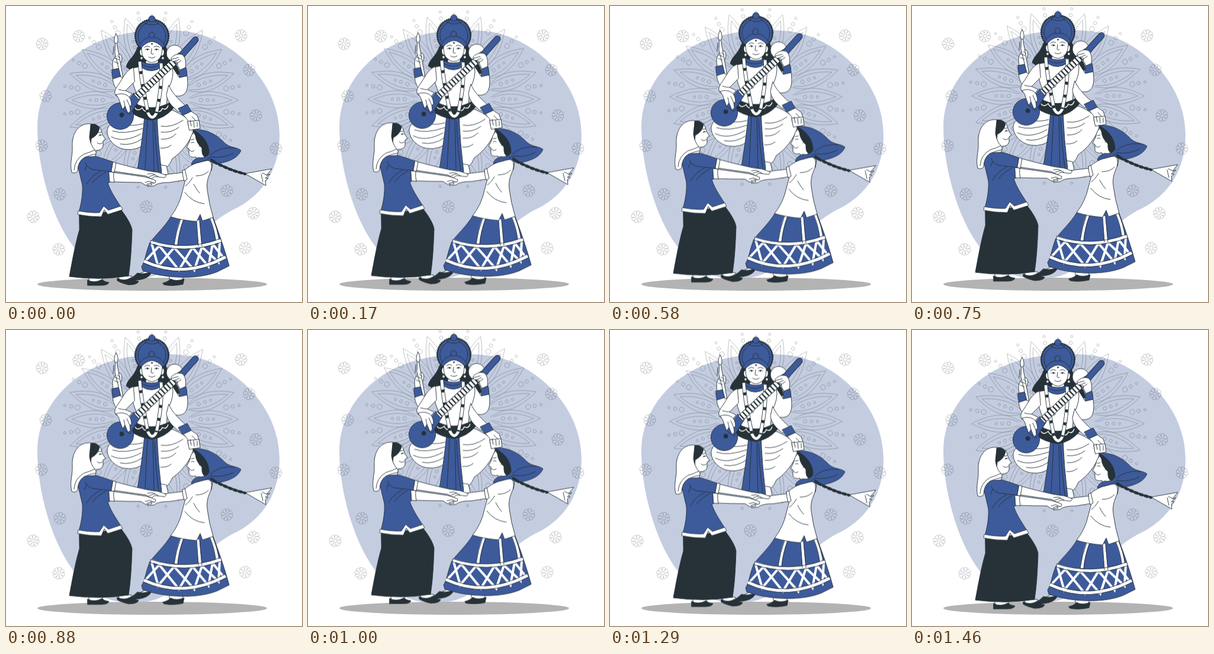
An HTML page for the animation above (1.5 s loop, 500 px wide and 500 px high).

```html
<!DOCTYPE html>
<html lang="en">
<head>
<meta charset="utf-8">
<title>Festival dance</title>
<style>
  html, body { margin: 0; width: 100%; height: 100%; overflow: hidden; background: #fff; }
  svg { display: block; width: 100vw; height: 100vh; }
  .w, .b, .k, .l { stroke: #263238; stroke-width: .9; stroke-linecap: round; stroke-linejoin: round; }
  .w { fill: #fff; }
  .b { fill: #3d5a9b; }
  .k { fill: #263238; }
  .l { fill: none; }
  .band { fill: none; stroke: #fff; stroke-width: 5; }
  .faint { fill: none; stroke: #263238; stroke-width: .8; opacity: .34; }
  #float { animation: float 1.5s linear infinite; }
  @keyframes float {
    0%, 100% { transform: translateY(0); }
    70% { transform: translateY(-10px); }
  }
</style>
</head>
<body>
<svg viewBox="0 0 500 500">
  <defs>
    <g id="petal">
      <path d="M-146 0C-130-8-113-15-93-14.5C-80-13-70-8-62-3M-146 0C-130 8-113 15-93 14.5C-80 13-70 8-62 3"/>
      <path d="M-135 0C-118-7-104-9-90-8.5Q-78-8-66-3M-135 0C-118 7-104 9-90 8.5Q-78 8-66 3"/>
      <circle cx="-83" r="3"/><circle cx="-94" r="2.6"/><circle cx="-104" r="2"/>
      <g transform="rotate(9)">
        <circle cx="-127" r="4.2"/><circle cx="-138" r="2.9"/><circle cx="-149" r="2"/>
      </g>
    </g>
    <path id="leaf" d="M-1.5-4.4C-5-9.8-1.5-10.4 0-9.6C1.5-10.4 5-9.8 1.5-4.4"/>
  </defs>

  <path fill="#c4cce0" d="M53 205C53 150 84 99 140 68C186 43 255 35 312 44C385 58 462 128 462 218C462 276 434 318 390 341C346 361 331 390 303 418C280 445 255 461 215 461C172 461 139 444 115 408C76 357 53 270 53 205Z"/>
  <g id="flowers" class="faint"></g>
  <ellipse cx="247" cy="470" rx="194" ry="11" fill="#b3b3b3"/>

  <g id="float">
    <g id="mandala" class="faint" transform="translate(246.5 159)"></g>

    <g id="musician">
      <path class="k" d="M222 70C216 88 206 90 203 103L226 118L272 112L293 116C293 102 282 95 279 85L268 66Z"/>
      <!-- raised arm with brush -->
      <path class="w" d="M180 121Q181 140 194 145L208 126L193 119Z"/>
      <path class="b" d="M179 108L190 105Q193 112 193 119L181 123Q178 115 179 108Z"/>
      <path class="w" d="M181 107C178 94 182 85 189 82C195 80 197 86 195 93Q193 100 191 105Z"/>
      <path class="w" d="M185 62L187 62L197 117Q198 123 194 120L184 80Z"/>
      <path class="w" d="M186 47Q191 55 188 63L184 63Q181 55 186 47Z"/>
      <path class="l" d="M182 68L181 82M183 88L191 91M183 94L190 97M188 84L193 88"/>
      <!-- raised arm on the neck -->
      <circle class="w" cx="285" cy="80" r="14"/>
      <path class="w" d="M281 103L292 120L306 118C308 132 307 144 301 149C293 155 282 152 274 146L270 118Z"/>
      <path class="b" d="M294 107L304 104Q306 111 306 118L293 121Z"/>

      <!-- legs -->
      <path class="w" d="M219 176C198 188 173 195 171 210C170 224 183 239 200 242Q222 246 240 229L251 190Z"/>
      <path class="w" d="M256 182L281 176C300 184 317 195 316 212C311 229 297 247 281 258Q277 268 272 272L255 270Z"/>
      <path class="w" d="M259 268L271 270L274 284Q269 290 256 287L255 281L262 278Z"/>
      <path class="l" d="M180 211Q199 218 231 207M178 221Q199 232 228 216M193 233Q212 237 231 224M194 199Q214 204 231 199M262 203Q280 206 299 193M262 213Q279 215 292 205M262 225Q278 226 287 216M261 240Q272 241 279 235"/>
      <path class="b" d="M234 187Q230 228 222 277Q229 274 236 279Q243 275 250 281L263 282Q257 234 255 187Z"/>
      <path class="l" d="M239 191L235 276M248 191L250 280M251 196Q252 232 258 280"/>

      <!-- torso -->
      <path class="w" d="M236 93L236 101L213 105Q211 125 219 144L222 171Q247 185 271 171L273 143Q285 120 281 104L257 101L257 91Z"/>
      <path class="k" d="M216 163Q245 181 279 162L284 171Q269 190 246 193Q224 190 208 178Z"/>
      <path fill="none" stroke="#fff" stroke-width="1.4" d="M218 172Q222 179 230 172Q234 181 241 176M254 177Q261 181 264 173Q271 177 274 168"/>
      <path class="b" d="M230 94Q246 102 262 94L264 102Q247 116 229 104Z"/>
      <path class="l" d="M229 99Q246 109 263 97M231 142Q238 147 243 143"/>

      <!-- lower arm -->
      <path class="w" d="M275 134C280 145 288 155 304 169L292 179C280 170 272 160 271 150Z"/>
      <path class="b" d="M291 173L306 166L313 178L298 184Z"/>
      <path class="w" d="M300 184L313 178L323 185Q327 193 326 202L308 202L307 193Z"/>
      <path class="w" d="M307 195L326 193L328 207L310 210Z"/>
      <path class="l" d="M314 187L321 194M311 193L313 203M317 195L318 205M323 196L323 204"/>

      <!-- garland -->
      <g fill="none">
        <path id="garland" stroke="#263238" stroke-width="6.5" d="M226 94C228 127 235 156 240 181Q247 195 254 181C260 154 264 126 262 97"/>
        <path stroke="#fff" stroke-width="4.8" d="M226 94C228 127 235 156 240 181Q247 195 254 181C260 154 264 126 262 97"/>
        <path stroke="#263238" stroke-width="5" stroke-dasharray="5 17" stroke-dashoffset="-16" d="M226 94C228 127 235 156 240 181"/>
        <path stroke="#263238" stroke-width="5" stroke-dasharray="5 17" stroke-dashoffset="-16" d="M262 97C264 126 260 154 254 181"/>
      </g>

      <!-- veena -->
      <g fill="none" stroke-linecap="round">
        <path stroke="#263238" stroke-width="11" d="M320 57L294 86"/>
        <path stroke="#3d5a9b" stroke-width="9.2" d="M320 57L294 86"/>
      </g>
      <circle class="b" cx="193" cy="186" r="22.5"/>
      <path class="b" d="M216 147L227 156L209 184L196 174Z"/>
      <path stroke="#263238" stroke-width="12" d="M296 83L220 154"/>
      <path stroke="#fff" stroke-width="10.4" d="M295 84L220.600 153.400"/>
      <path stroke="#263238" stroke-width="10.400" stroke-dasharray="2.400 4" d="M294 85L222 152"/>
      <circle class="k" cx="195.500" cy="184" r="3.500"/>

      <!-- plucking arm -->
      <path class="w" d="M215 104C202 108 197 124 187 137Q181 146 186 152L205 158L213 148L202 143L217 128Z"/>
      <path class="w" d="M186 150Q191 155 193 164L197 175L201 169L206 181L210 178L209 169L212 168Q212 156 205 151Q195 146 186 150Z"/>
      <path class="l" d="M199 160L201 169M204 158L209 169M190 141Q197 143 202 143"/>
      <path class="w" d="M279 88C283 82 293 79 299 83C304 89 304 97 303 104L294 108Q289 101 289 95L280 93Z"/>
      <path class="l" d="M280 90L291 87M283 94L293 90M289 97L296 92"/>

      <!-- head -->
      <circle cx="246.500" cy="51" r="28" fill="none" stroke="#263238" stroke-width="3.600" stroke-linecap="round" stroke-dasharray="0 3.500"/>
      <circle class="b" cx="246.500" cy="51" r="27.500"/>
      <circle class="l" cx="246.500" cy="51" r="23.500"/>
      <path class="b" d="M235 29Q246 20 258 29Q247 35 235 29Z"/>
      <circle class="b" cx="246.500" cy="22" r="5.500"/>
      <path class="k" d="M225 68L231 59H262L268 68L264 82L229 82Z"/>
      <path class="w" d="M229 73Q225 73 226 80Q227 85 231 84M264 73Q268 73 267 80Q266 85 262 84"/>
      <path class="w" d="M229 68Q237 57 246.500 56Q256 57 264 68C264 81 262 86 257 91Q246 100 236 91C230 86 229 81 229 68Z"/>
      <path class="b" d="M224 68Q231 53 246.500 52Q262 53 269 68L264 70Q256 61 246.500 60Q237 61 229 70Z"/>
      <circle class="b" cx="246" cy="49" r="4.800"/>
      <circle class="k" cx="246.500" cy="64" r="1"/>
      <path class="l" d="M234 70Q238 66 243 69M250 69Q255 66 259 70M235 74Q239 71 242 74M251 74Q254 71 258 74M246 72L245 80Q246 82 249 81M241 86Q246 90 252 86"/>
      <circle class="k" cx="239" cy="73.500" r="1"/><circle class="k" cx="254" cy="73.500" r="1"/>
      <circle class="w" cx="229" cy="88" r="2.300"/><circle class="w" cx="265" cy="88" r="2.300"/>
    </g>

    <g id="girl">
      <path class="w" d="M220 455L239 446L247 449L234 459Z"/>
      <path class="k" d="M207 461Q216 458 222 451Q232 454 246 449Q244 457 232 461Q218 465 207 461Z"/>
      <path class="w" d="M276 456L300 456L297 465L277 466Z"/>
      <path class="k" d="M265 468Q274 466 278 461Q287 466 301 461L299 470Q281 474 267 471Z"/>

      <!-- braid -->
      <path class="w" d="M404 283L449 275L440 286L446 284L438 291L443 291L438 295L439 303Z"/>
      <path class="l" d="M431 284L434 297M433 282L441 286"/>
      <path fill="none" stroke="#263238" stroke-width="3" stroke-linecap="round" d="M343 257Q369 275 405 284"/>
      <path fill="none" stroke="#263238" stroke-width="4.800" stroke-linecap="round" stroke-dasharray="4 5" d="M345 259Q370 275 403 283.500"/>

      <!-- skirt -->
      <path class="b" d="M279 355C267 375 251 388 243 400C236 416 235 432 229 440L231 447C263 459 320 464 357 449L377 439C370 414 362 389 349 355Z"/>
      <path class="band" d="M297 360Q289 382 287 403M324 362L328 407M346 357Q354 376 357 396"/>
      <path class="band" d="M245 398Q303 418 363 396"/>
      <path class="band" d="M233 431Q300 462 371 424"/>
      <g class="band" style="stroke-width:4">
        <path d="M246 401L257 440L284 408L318 446L331 407L359 433L361 398"/>
        <path d="M236 430L259 405L292 446L315 408L342 440L349 402L368 426"/>
      </g>
      <path class="l" d="M244 396Q303 415 362 393M242 401Q303 421 364 399M234 428Q300 459 370 421M232 434Q300 465 372 427M295 360Q287 382 284 403M300 361Q292 382 290 404M322 362L325 406M327 362L331 406M344 358Q352 376 354 395M349 357Q357 376 360 394"/>

      <!-- blouse and arm -->
      <path class="w" d="M302 277C310 269 326 262 345 260Q350 272 344 284Q338 297 340 311Q343 335 350 357L332 363L328 352L322 364Q297 362 278 356Q293 337 298 313L303 294Z"/>
      <path class="l" d="M315 290Q309 300 303 304M321 287Q335 287 342 279M302 315Q315 332 335 334M317 301Q322 311 327 316"/>
      <path class="w" d="M300 281Q275 284 252 287L242 292L234 297L233 301L242 300L239 305L250 304Q256 298 277 298L302 294Z"/>
      <path class="w" d="M298 278L302 276L306 293L301 296Q298 287 298 278Z"/>

      <!-- head -->
      <path class="w" d="M318 213C311 219 312 224 310 229L305 239L309 241L309 251Q311 257 321 255L324 265L343 260L341 228Z"/>
      <path class="k" d="M316 211C328 206 342 219 345 238Q345 253 338 256Q330 254 331 240Q321 231 320 219Z"/>
      <path class="b" d="M316 209C339 207 357 218 370 232C379 240 390 238 397 244Q393 253 384 258C369 266 352 269 342 261C334 260 324 265 313 268Q314 260 325 256Q338 258 343 249Q343 224 316 209Z"/>
      <path class="l" d="M345 252Q360 237 387 240M347 255Q366 258 384 249M340 259Q343 258 347 255M350 260Q348 272 347 278"/>
      <path class="l" d="M313 226L318 225M313 231Q316 229 318 231M310 243Q313 248 318 244M326 237Q330 234 331 240"/>
      <path fill="none" stroke="#263238" stroke-width="4.500" stroke-linecap="round" d="M347 260L356 266"/>
    </g>

    <g id="woman">
      <path class="w" d="M140 457H163V466H141Z"/>
      <path class="k" d="M138 463Q149 469 162 462Q166 466 174 467Q172 472 160 472H138Z"/>
      <path class="w" d="M190 456H212L212 464H192Z"/>
      <path class="k" d="M188 460Q200 466 211 459Q216 464 224 465Q222 471 207 471Q194 468 188 464Z"/>
      <path class="k" d="M124 353L195 345Q211 366 213 378C212 405 211 430 207 456Q159 464 107 457C112 430 117 402 124 378Z"/>

      <!-- arms -->
      <path class="w" d="M180 281Q210 285 236 289L246 292L253 295L252 299L244 299L247 302L236 303L228 298Q203 298 180 297Z"/>
      <path class="w" d="M182 264Q214 273 242 279L257 281L271 286L268 290L251 288L246 292L236 287Q207 283 181 279Z"/>
      <path class="l" d="M239 284L247 283L257 288M242 288L251 285M235 298L243 296L249 299M238 301L245 299"/>

      <!-- blouse -->
      <path class="b" d="M121 268C121 258 132 252 144 252Q158 255 182 264L179 280L177 297L172 299C178 317 189 330 196 343L172 350L166 340L160 355Q139 355 122 351C127 336 130 318 129 303Z"/>
      <path fill="#fff" stroke="#263238" stroke-width=".8" d="M122 346Q142 350 158 349L165 338L173 345L194 338L197 344L172 352L166 344L161 356Q140 356 121 352Z"/>
      <path class="w" d="M181 263L186 265L183 281L178 280Z"/>
      <path class="w" d="M174 280L182 281Q181 289 183 298L175 297Z"/>
      <path class="l" d="M134 265Q138 277 154 277L178 280M160 279Q146 285 136 301M168 281Q153 289 146 299M136 270L133 278"/>

      <!-- head -->
      <path class="w" d="M141 204L158 204C162 211 162 216 164 219L168 225L164 228L164 237Q162 244 152 244L151 254L137 255Z"/>
      <path class="k" d="M140 200Q153 197 158 206Q156 218 144 224L143 235L138 225Z"/>
      <path class="w" d="M143 199C122 197 111 216 112 237C113 253 107 265 111 281Q116 284 121 279Q121 263 132 256Q144 251 152 250Q153 246 150 243Q143 236 141 222Z"/>
      <path class="l" d="M115 277Q116 259 132 250Q143 247 150 243M156 214L161 213M157 219Q159 216 162 218M154 231Q158 235 163 231"/>
      <circle class="k" cx="159" cy="218" r=".7"/>
    </g>
  </g>
</svg>
<script>
  const NS = "http://www.w3.org/2000/svg";
  const add = (parent, tag, attrs) => {
    const el = document.createElementNS(NS, tag);
    for (const key in attrs) el.setAttribute(key, attrs[key]);
    return parent.appendChild(el);
  };
  const ring = (parent, href, count) => {
    for (let i = 0; i < count; i++) {
      add(parent, "use", { href, transform: `rotate(${i * 360 / count})` });
    }
  };

  ring(document.getElementById("mandala"), "#petal", 20);

  const spots = [
    [61, 64], [123, 51], [397, 50], [411, 108], [67, 152],
    [422, 185], [60, 236], [456, 241], [91, 318], [237, 339],
    [373, 312], [46, 356], [418, 350], [89, 411], [404, 409]
  ];
  const flowers = document.getElementById("flowers");
  for (const [x, y] of spots) {
    const g = add(flowers, "g", { transform: `translate(${x} ${y}) rotate(12)` });
    add(g, "circle", { r: 3 });
    ring(g, "#leaf", 8);
  }
</script>
</body>
</html>
```
